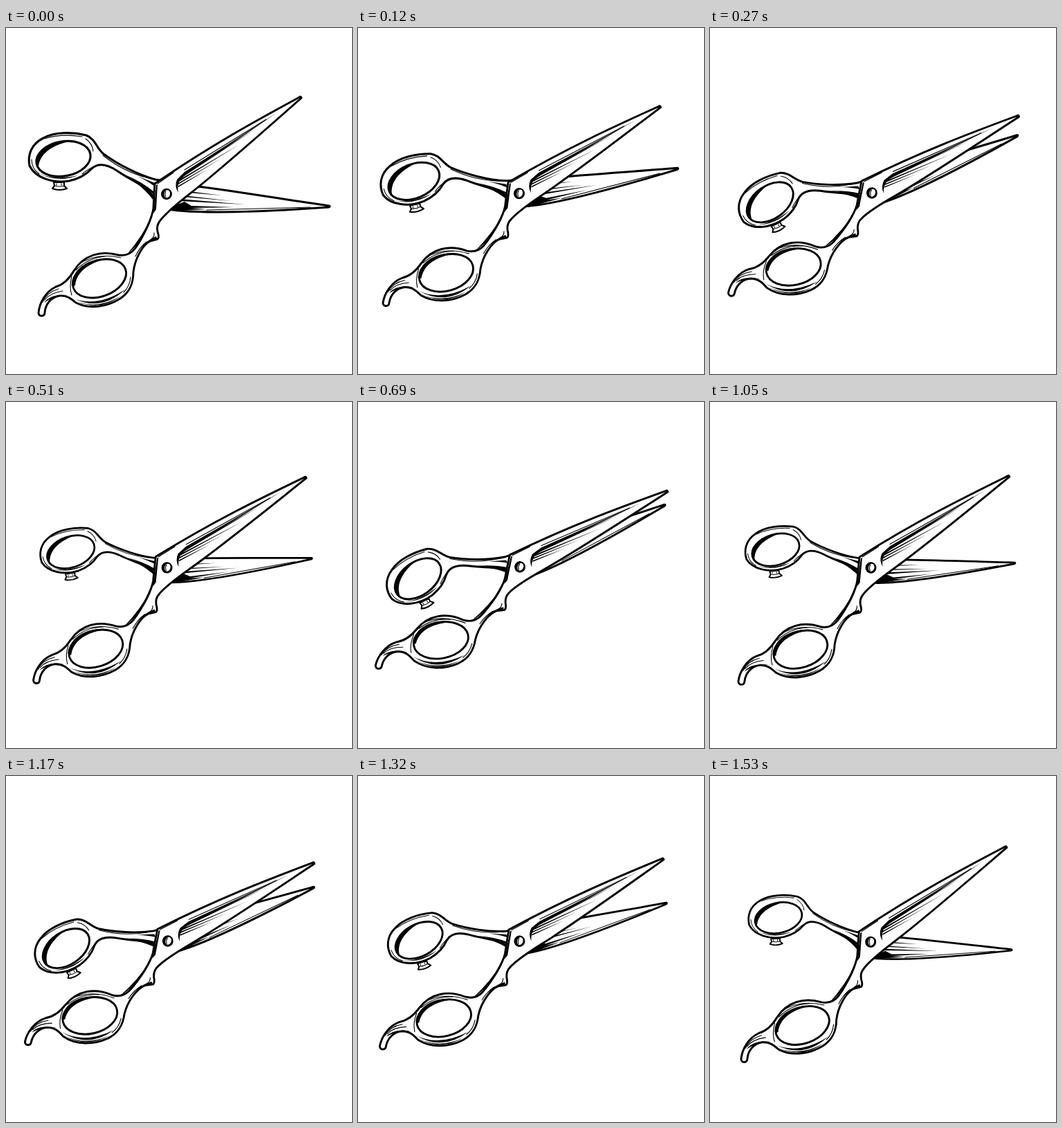
An HTML page for the animation above (1560 ms loop, 500 by 500 pixels).

```html
<!DOCTYPE html>
<html lang="en">
<head>
<meta charset="utf-8">
<title>Scissors</title>
<style>
  html, body { margin: 0; width: 100%; height: 100%; overflow: hidden; background: #fff; }
  svg { display: block; width: 100%; height: 100%; }
  .outline { fill: #fff; stroke: #000; stroke-width: 2.9; stroke-linejoin: round; stroke-linecap: round; }
  #back .outline { stroke-width: 3.1; }
  #back .knob { stroke-width: 2.1; }
  .thin { fill: none; stroke: #000; stroke-width: 1.1; stroke-linecap: round; }
</style>
</head>
<body>
<svg viewBox="0 0 500 500">
  <g id="back">
    <path class="outline knob" d="M69 223L70 228L67 232Q77 236 88 232L84 228V223Z"/>
    <path class="thin" d="M71 228Q77 230 84 228M73 225V227M80 225V227"/>
    <path class="outline" d="M467 257C410 249 340 237 277 229L216 219C190 212 160 196 141 182C130 173 130 161 116 155C95 150 70 150 54 159C36 168 31 184 34 199C42 216 67 225 91 221C105 218 116 212 124 203C134 194 146 197 160 206C180 220 200 227 211 241L225 260C260 269 350 266 420 262L466 259Q469 258 467 257Z"/>
    <ellipse class="outline" cx="83" cy="189" rx="39.5" ry="25" transform="rotate(-10 83 189)"/>
    <path d="M44 200C42 179 62 163 96 163C68 168 49 181 47 200Z"/>
    <path d="M40 206Q64 222 104 213Q72 226 40 206Z"/>
    <path class="thin" d="M55 160Q80 152 110 157M37 190Q37 203 48 211M115 160Q125 167 126 178M140 184Q170 208 206 217M130 199Q118 204 110 211"/>
    <path d="M172 212Q196 222 213 236V240Q198 227 172 212ZM182 219Q202 230 212 242V248Q204 236 182 219ZM190 214L215 224V229Q206 222 190 214Z"/>
    <path d="M238 259L258 251L268 257L330 259L268 260L290 262L238 264Z"/>
    <path d="M250 247L346 255L250 250ZM256 242L326 250L256 244ZM264 236L312 242L264 238Z"/>
    <path class="thin" d="M290 263L440 259"/>
  </g>
  <g id="front">
    <path class="outline" d="M424 100C365 132 300 167 215 225L214 240L213 260C212 272 199 301 187 318C181 326 173 330 162 328C137 321 112 328 98 351C90 365 82 371 72 374C57 381 48 398 47 412C48 418 56 417 56 411C57 399 65 389 77 387C88 386 94 391 101 397C121 407 146 403 165 391C180 381 184 368 184 353C186 334 197 314 208 308L219 305Q222 303 219 294Q217 285 223 278C236 261 262 243 280 228C330 187 378 144 427 101Q426 98 424 100Z"/>
    <ellipse class="outline" cx="135" cy="362" rx="40" ry="26" transform="rotate(-20 135 362)"/>
    <path d="M96 374C93 350 118 332 148 333C120 339 102 352 100 372Z"/>
    <path d="M98 391Q132 404 172 378Q138 410 98 391ZM104 396Q136 406 166 387Q138 409 104 396Z"/>
    <path d="M217 227L219 226L217 262L213 268Z"/>
    <path d="M212 270Q203 304 174 328Q196 303 212 270Z"/>
    <path class="thin" d="M104 342Q130 324 166 332M101 350Q118 332 144 330M180 360Q179 373 170 382M95 359Q91 374 95 386M53 396Q59 382 76 377M56 393Q63 383 82 380M187 330Q193 317 203 309M214 296Q215 302 209 306"/>
    <path d="M55 397Q64 384 90 386Q69 387 55 397ZM193 320Q201 308 217 301L218 304Q202 309 193 320Z"/>
    <path d="M249 238Q243 229 247 219L258 208Q326 165 392 122Q326 168 264 208L251 220Q247 229 249 238Z"/>
    <path d="M252 214L360 146L253 217ZM249 220L338 168L250 222ZM249 224L312 188L249 226ZM249 228L292 204L249 230Z"/>
    <path class="thin" d="M219 225L242 209M258 205L376 132"/>
    <ellipse cx="232" cy="240" rx="8" ry="8.2"/>
    <ellipse cx="232.7" cy="239.6" rx="4.2" ry="5.6" fill="#fff" transform="rotate(12 232 240)"/>
    <path class="thin" d="M231 236Q229 240 231 244"/>
  </g>
</svg>
<script>
  const LOOP = 1560;
  // Blades are open at even entries and closed at odd ones.
  const turns = [0, 248, 397, 694, 960, 1227, 1480, 1747];
  const first = { scale: 1, x: 0, y: 0 };
  const open = { scale: 0.863, x: -0.5, y: 5.3 };
  const closed = { scale: 0.954, x: 4, y: 0.3 };
  const back = document.getElementById('back');
  const front = document.getElementById('front');
  const mix = (a, b, k) => a + (b - a) * k;

  function draw(t) {
    const leg = turns.findIndex(end => end > t) - 1;
    const k = (t - turns[leg]) / (turns[leg + 1] - turns[leg]);
    const eased = (1 - Math.cos(Math.PI * k)) / 2;
    const shut = leg % 2 ? 1 - eased : eased;
    const from = leg === 0 ? first : open;
    const [scale, x, y] = ['scale', 'x', 'y'].map(key => mix(from[key], closed[key], shut));
    front.setAttribute('transform', `rotate(${8.6 * shut} 244.5 252.5)`);
    back.setAttribute('transform',
      `translate(${220 + x} ${237 + y}) rotate(${-26.8 * shut}) scale(${scale}) translate(-220 -237)`);
  }

  const start = performance.now();
  function tick() {
    draw((performance.now() - start) % LOOP);
    requestAnimationFrame(tick);
  }
  tick();
</script>
</body>
</html>
```
